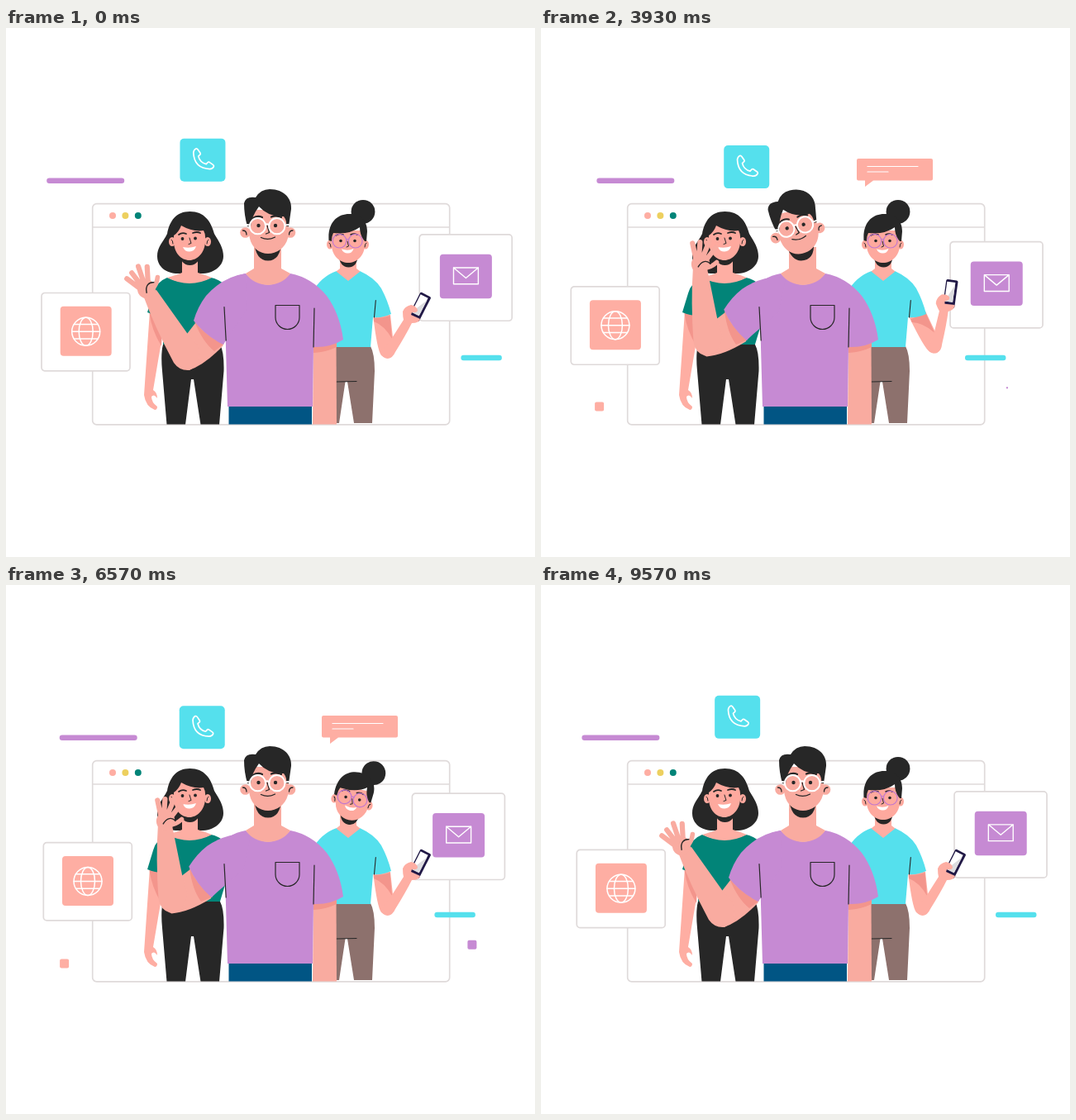
These frames come from a looping animation (640x640 px, 9.64 s). An HTML page:

```html
<!DOCTYPE html>
<html lang="en">
<head>
<meta charset="utf-8">
<title>Team contact</title>
<style>
  html, body { margin: 0; height: 100%; overflow: hidden; background: #fff; }
  svg { display: block; width: 100vw; height: 100vh; }
  .ln { fill: none; stroke-linecap: round; stroke-linejoin: round; }
  .ink { stroke: #272727; }
  .wh { stroke: #fff; }
  .hair { fill: #272727; }
  .skin { fill: #feaea3; }
  .man { fill: #f9aba0; }
  .face { fill: #fea99e; }
  .shade { fill: #f3958c; }
  .lilac { fill: #c68ad3; }
  .cyan { fill: #55e0ed; }
  .teal { fill: #028478; }
  .frame { fill: #fff; stroke: #dfdada; stroke-width: 1.7; }
</style>
</head>
<body>
<svg viewBox="0 0 640 640">
  <defs>
    <clipPath id="floor"><rect width="640" height="479.4"/></clipPath>
  </defs>

  <!-- browser window -->
  <rect class="frame" x="104.7" y="212.6" width="432" height="267.3" rx="5"/>
  <path class="frame" d="M105 241H536"/>
  <circle cx="129" cy="227" r="4" class="skin"/>
  <circle cx="144.4" cy="227" r="4" fill="#edd05f"/>
  <circle cx="159.8" cy="227" r="4" class="teal"/>

  <!-- floating items -->
  <rect id="barL" class="lilac" y="181.4" width="94" height="6.5" rx="3.2"/>
  <rect id="barR" class="cyan" y="395.7" width="49.5" height="6.5" rx="3.2"/>
  <g id="call">
    <rect class="cyan" width="55" height="52" rx="5"/>
    <path class="ln wh" stroke-width="1.7" transform="translate(28.6 24.7)"
      d="M-12.3-7.5Q-12-11-9.3-12.3Q-8-12.8-7-11.3L-4-7Q-3.4-5.8-4.4-4.9L-6.3-3.2Q-4.5 4.5 3.2 6.3L4.9 4.4Q5.8 3.4 7 4L11.3 7Q12.8 8 12.3 9.3Q11 12 7.5 12.3Q-11.5 11.5-12.3-7.5Z"/>
  </g>
  <g id="web">
    <rect class="frame" width="107" height="94.3" rx="4"/>
    <rect x="22.7" y="16.3" width="62" height="60" rx="4" class="skin"/>
    <g class="ln wh" stroke-width="1.5" transform="translate(53.7 46.8)">
      <circle r="17"/><ellipse rx="8.5" ry="17"/>
      <path d="M-17 0H17M-14.5-8.8H14.5M-14.5 8.8H14.5"/>
    </g>
  </g>
  <g id="mail">
    <rect class="frame" width="112" height="104.3" rx="4"/>
    <rect x="24.7" y="23.8" width="63" height="53.5" rx="4" class="lilac"/>
    <path class="ln wh" stroke-width="1.4" d="M41.3 40H71.2V59.8H41.3ZL56.2 52.5L71.2 40"/>
  </g>
  <g id="chat">
    <path class="skin" d="M384 158H472Q474 158 474 160V182.5Q474 184.5 472 184.5H402L392 192V184.5H384Q382 184.5 382 182.5V160Q382 158 384 158Z"/>
    <path class="ln wh" stroke-width="1.2" d="M395 167.5H456M395 174H420"/>
  </g>
  <rect id="dotL" class="skin" x="-5.5" y="-5.5" width="11" height="11" rx="2"/>
  <rect id="dotR" class="lilac" x="-5.5" y="-5.5" width="11" height="11" rx="2"/>

  <g clip-path="url(#floor)">
    <!-- woman on the left -->
    <path class="skin" d="M174 342L190 345L187 385L178 438Q183 441 183 448Q179 442 176 446Q176 453 183 458Q183 462 180 462Q169 458 167 444Z"/>
    <path class="shade" d="M173.5 345L190 348L188 385Q176 365 173.5 345Z"/>
    <path class="teal" d="M195 302Q182 307 178 321L171 344Q180 348 190 348V386H258L275 330Q268 306 248 302Q222 314 195 302Z"/>
    <path class="hair" d="M190 383H259Q264 392 263.5 415L258 480H235.500L227 425H224L217 480H194.500L189 415Q187 394 190 383Z"/>
    <path id="hairA" class="hair" d="M222.500 222C240 222 248 234 252 249C258 259 263 266 263 276C263 289 250 297 236 297H208C194 297 183 289 183 276C183 265 190 259 195 249C198 233 206 222 222.500 222Z"/>
    <path class="skin" d="M213 276H232V296Q242 299 249 302Q222 316 195 302Q206 299 213 296Z"/>
    <g id="headA">
      <path class="hair" d="M209 270Q211 287 222.500 287Q234 287 236 270Z"/>
      <ellipse class="face" cx="201" cy="258.5" rx="4" ry="5.5"/>
      <ellipse class="face" cx="244" cy="258.5" rx="4" ry="5.5"/>
      <path class="face" d="M203 251Q209 247 212 239Q226 247 239 245Q242 250 241 258C241 272 231 281 222 281C212 281 203 272 203 258Z"/>
      <path class="ln ink" stroke-width="1.8" d="M209 250Q213 247 218 249M226 248Q231 246 235 248"/>
      <path class="ln ink" stroke-width="1" d="M222 254L224 260.5L221 261.5M200 256Q202 257 202 261M245 256Q243 257 243 261"/>
      <circle class="hair" cx="213.5" cy="255" r="1.9"/><circle class="hair" cx="229" cy="254.5" r="1.9"/>
      <path fill="#fff" d="M214 265Q222 267 230 264Q228 270.5 222 270.5Q216 270.5 214 265Z"/>
    </g>

    <!-- woman on the right -->
    <path fill="#8d716d" d="M396 385H441Q446 394 446 415L443 478H421L413 428H410.5L403 478H394Z"/>
    <path class="ln ink" stroke-width="1.2" d="M400 428L424 427.5"/>
    <g id="armB">
      <path class="skin" d="M444 347H465L468 374Q473 390 467 397Q460 402 454 396Q449 390 444 347Z"/>
      <path class="shade" d="M445 351Q456 351 464.5 348L467 376Q458 360 445 355Z"/>
      <g id="foreB">
        <g transform="translate(500.5 337.4) rotate(27)">
          <rect x="-7.2" y="-16.7" width="14.4" height="33.4" rx="1.8" fill="#211946"/>
          <path fill="#fff" d="M-5.9-14H4.2V10H-5.9Z"/>
          <path fill="#dcdcdf" d="M4.2-11V10H-5.9Z"/>
        </g>
        <path class="skin" d="M453 393Q456 400 462 400Q468 399 471 392Q484 371 491 357Q500 357 501 352L490 347L491 344Q498 345 498 341Q496 336 490 335Q482 337 480 343Q480 349 481 353L467 375Z"/>
      </g>
    </g>
    <path class="cyan" d="M400 294L414 305L428 294Q446 302 454 315Q462 330 466 346Q456 351 444 350L441 386H380L370 320Q382 300 400 294Z"/>
    <path class="ln ink" stroke-width="1.1" d="M447.3 329.5L445.5 350"/>
    <path class="skin" d="M404 274H424V291L428.500 294.500L414 306L399.500 294.500L404 291Z"/>
    <g id="headB">
      <circle class="hair" cx="432" cy="222.3" r="14.4"/>
      <path class="hair" d="M402 274Q404 289.5 414.5 289.5Q425 289.5 426 274Z"/>
      <ellipse class="face" cx="392" cy="262" rx="4" ry="5.5"/>
      <ellipse class="face" cx="435" cy="262" rx="4" ry="5.5"/>
      <path class="face" d="M394 245H434V262C434 276 424 284 414 284C404 284 394 276 394 262Z"/>
      <path class="hair" d="M390.5 257C389 234 402 225 415 225C430 225 437 234 437 246L436 258H434Q428 251 428 241Q416 250 396 248Q394 252 394 258Z"/>
      <path class="ln ink" stroke-width="1.6" d="M399 251Q403 248 408 250M417 250Q421 248 425 250"/>
      <path class="ln ink" stroke-width="1" d="M413 258L414.5 264L412 265M391 260Q393 261 393 265M436 260Q434 261 434 265"/>
      <circle class="hair" cx="405" cy="257.5" r="1.8"/><circle class="hair" cx="422" cy="257.5" r="1.8"/>
      <g class="ln" stroke="#c277cf" stroke-width="1.2">
        <circle cx="403.5" cy="257.7" r="8.3"/><circle cx="422.8" cy="257.7" r="8.3"/>
        <path d="M411.5 256Q413 255 414.5 256"/>
      </g>
      <path fill="#fff" d="M406 267.5Q414 270 420.5 267Q419 272.5 413.5 272.5Q408 272.5 406 267.5Z"/>
    </g>

    <!-- man -->
    <path class="man" d="M372 382L399.5 378L400 480H371Z"/>
    <path class="shade" d="M372 385Q390 386 400 380V386Q388 392 372 393Z"/>
    <rect x="269.5" y="456" width="100.5" height="24" fill="#015584"/>
    <path class="lilac" d="M290 297Q317 324 344 297Q370 302 388 324Q404 346 408 377Q392 387 372 386L371 458H268L265 350L255 318Q268 301 290 297Z"/>
    <g id="armM">
      <path class="man" d="M233 352L219 370L204 398Q210 412 221 414Q240 408 263 384Z"/>
      <path class="shade" d="M228 355Q243 374 264 382L252 391Q238 380 228 355Z"/>
      <g id="foreM">
        <path class="man" d="M165 321L182 317L219 369L232 384Q238 406 222 414Q210 415 203 405Q180 362 165 321Z"/>
        <g id="hand">
          <ellipse class="man" cx="171" cy="315" rx="11" ry="11.5"/>
          <g class="ln" stroke="#f9aba0" stroke-width="6.2">
            <path d="M164 314L149.5 299M165 309L156.5 293M169 307L165.5 286.5M174 308L176 288.5"/>
            <path stroke-width="5.5" d="M178 316Q184 312 186.5 303"/>
          </g>
          <path class="ln ink" stroke-width="1.4" d="M170.5 319.5C170 311 175 307 181 308.5"/>
        </g>
      </g>
      <path class="lilac" d="M290 297Q262 301 242 324Q232 337 227 354Q242 373 263 383L268 375L292 340Z"/>
    </g>
    <path class="ln ink" stroke-width="1.2" d="M264 337.5L266.2 378M373 339L372 386M326 335.5H355V350A14.5 14.5 0 0 1 326 350Z"/>
    <path class="man" d="M300 265H333V291L344 297Q335 310 317 311Q299 310 290 297L300 291Z"/>
    <g id="headM">
      <path class="hair" d="M300 258Q302 281.5 317 281.5Q332 281.5 333.5 258Z"/>
      <circle class="man" cx="289.5" cy="247.5" r="6.3"/><circle class="man" cx="344" cy="247.5" r="6.3"/>
      <path class="man" d="M294 220H342V246C342 264 329 273 317 273C305 273 294 264 294 246Z"/>
      <path class="hair" d="M292 240Q288 226 288 212Q290 203 302 205Q308 195 319 195C337 195 346 207 345 219L342 240H339Q340 233 336 228Q318 229 306 216Q297 228 296 240Z"/>
      <path class="ln ink" stroke-width="2.2" d="M299 230Q304 226.5 310 229M321 228.5Q327 226 333 229"/>
      <circle class="hair" cx="305.5" cy="239" r="2.2"/><circle class="hair" cx="326" cy="239" r="2.2"/>
      <path class="ln ink" stroke-width="1.3" d="M316 239L318.5 247.5L314.5 249M308.5 253.5Q317 257.5 325.5 253M286.5 245Q291 245 291 250M347 245Q342.5 245 342.5 250"/>
      <g class="ln wh" stroke-width="2">
        <circle cx="304.5" cy="239.7" r="9.6"/><circle cx="327.8" cy="239.7" r="9.6"/>
        <path d="M314 238Q316 236.5 318 238M295 238.5L291 238M337.5 238.5L342 238"/>
      </g>
    </g>
  </g>
</svg>
<script>
const LOOP = 9640;
const BEAT = 2620;
const part = {};
document.querySelectorAll('[id]').forEach(el => part[el.id] = el);

const ease = u => {
  u = Math.min(1, Math.max(0, u));
  return u * u * (3 - 2 * u);
};
// Goes 0 to 1 at `on`, back to 0 at `off`, each over `span` ms.
const swing = (t, on, off, span) => ease((t - on) / span) - ease((t - off) / span);
// One slow oscillation per loop, highest at `peak`.
const orbit = (t, mid, amp, peak) => mid + amp * Math.cos(2 * Math.PI * (t - peak) / LOOP);
// Three waves of the hand, then rest.
const wave = t => t < 3 * BEAT ? ease(0.5 - 0.9 * Math.cos(2 * Math.PI * t / BEAT)) : 0;

const put = (id, value) => part[id].setAttribute('transform', value);
const move = (id, x, y, more = '') => put(id, `translate(${x} ${y}) ${more}`);
const turn = (id, a, x, y) => put(id, `rotate(${a} ${x} ${y})`);

function draw(t) {
  move('call', orbit(t, 214.3, 7.8, 3200), orbit(t, 139.6, 7.5, 5820));
  move('web', orbit(t, 41, 6, 7750), orbit(t, 315.7, 5.3, 680));
  move('mail', orbit(t, 496.3, 5.3, 1150), orbit(t, 253.7, 5, 3700));
  const glide = Math.sin(Math.PI * t / LOOP) ** 1.2;
  move('barL', 49.2 + 19.1 * glide, 0);
  move('barR', 550.4 - 39.4 * glide, 0);

  const pop = swing(t, 2200, 7550, 600);
  const lean = (t < LOOP / 2 ? -6 : 22) * (1 - pop);
  move('chat', 392, 191, `rotate(${lean}) scale(${pop}) translate(-392 -191)`);
  move('dotL', 70.6, 458, `scale(${swing(t, 1400, 8100, 600)})`);
  const blink = swing(t, 400, 3500, 600) + swing(t, 4050, 7250, 600);
  move('dotR', 563.9, 435.3, `scale(${blink})`);

  const w = wave(t);
  turn('armM', 14.7 * w, 275, 325);
  turn('foreM', 9.3 * w, 222, 395);
  turn('hand', 8 * w - 9 * (1 - swing(t, 700, 8800, 600)), 175, 322);

  turn('armB', -19 * swing(t, 2700, 4800, 1000), 450, 345);
  turn('foreB', 7 * swing(t, 4300, 5200, 700), 461, 388);

  const nod = -7 * swing(t, 900, 2700, 700);
  turn('hairA', nod, 222, 305);
  turn('headA', nod, 222, 305);
  turn('headM', -13 * swing(t, 2900, 5200, 700), 316, 275);
  turn('headB', 12 * swing(t, 5700, 7800, 800), 413, 286);
}

const start = performance.now();
function tick() {
  draw((performance.now() - start) % LOOP);
  requestAnimationFrame(tick);
}
tick();
</script>
</body>
</html>
```
